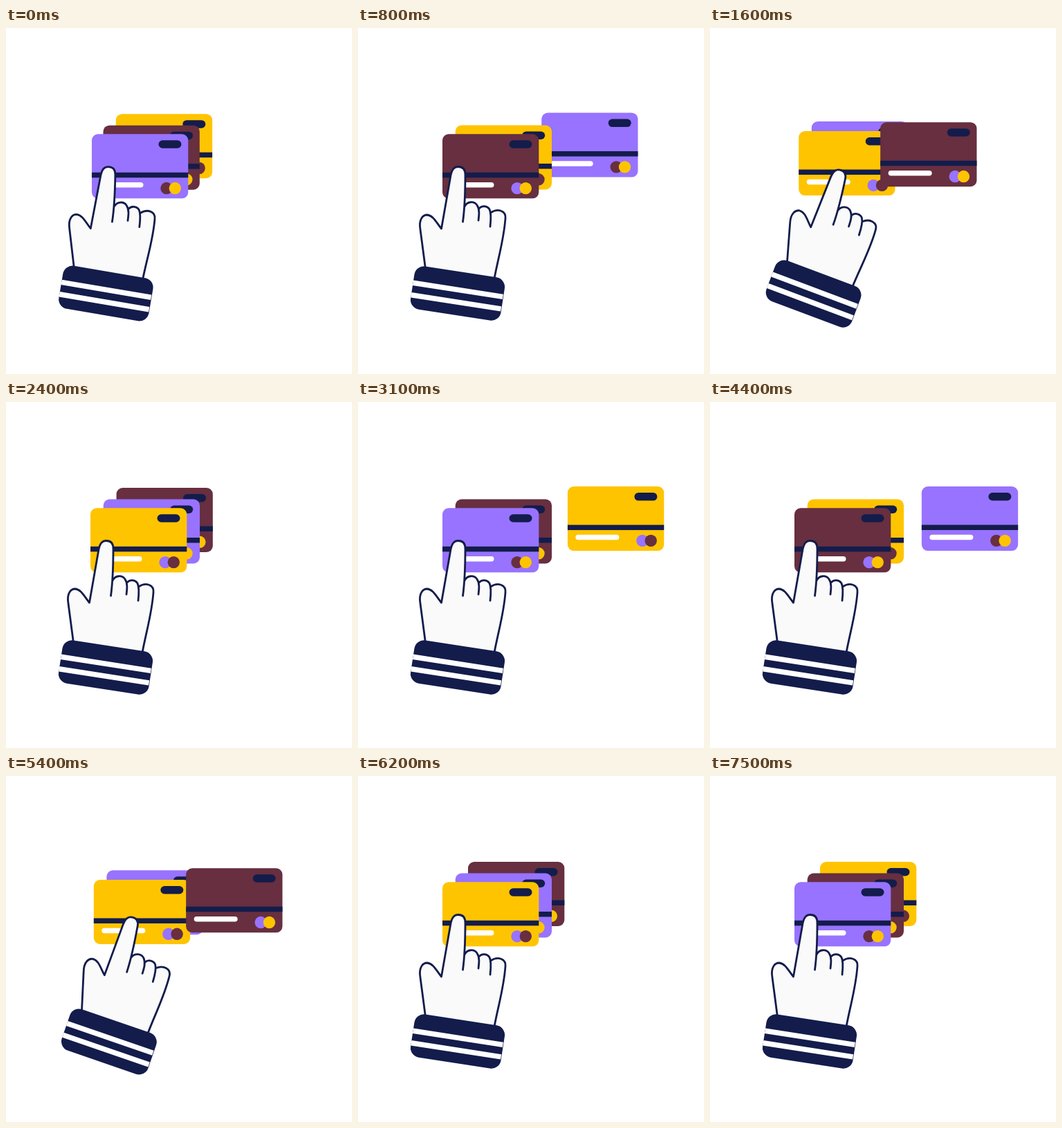
Write an HTML page that moves like this. It is 500 px wide and 500 px high and loops after 7600 ms.

```html
<!DOCTYPE html>
<html lang="en">
<head>
<meta charset="utf-8">
<title>Card stack</title>
<style>
  html, body { margin: 0; height: 100%; overflow: hidden; background: #fff; }
  svg { display: block; width: 100%; height: 100%; }
</style>
</head>
<body>
<svg viewBox="0 0 500 500">
  <g id="stack"></g>
  <g id="hand">
    <path d="M97.500 348 L90 291 C87.500 276 94 270 100 270 C109 271 113 281 120.500 290
             L134 213 C136 204 139 200.500 145 200.500 C151 200.500 155 204 155 212 L154 257
             C158 251 169 249 174 260 C179 255 189 258 191 266
             C202 260 214 264 213 275 C211 305 203 330 197 362 Z" fill="#fafafa"/>
    <path d="M97.500 348 L90 291 C87.500 276 94 270 100 270 C109 271 113 281 120.500 290
             L134 213 C136 204 139 200.500 145 200.500 C151 200.500 155 204 155 212
             C155 235 154 262 151.500 280
             M154 258 C158 250 168 250 172 256 C176 262 175 270 174 278
             M175 261 C179 256 187 257 190 262 C193 268 192 278 191 287
             M191.500 267 C202 260 214 264 213 275 C211 305 203 330 197 362"
          fill="none" stroke="#131c4b" stroke-width="2.800" stroke-linecap="round" stroke-linejoin="round"/>
    <g transform="translate(144 383.500) rotate(8.800)">
      <rect x="-66" y="-31.500" width="132" height="63" rx="14" fill="#131c4b"/>
      <path d="M-66 -5.200H65.300M-66 12.500H65.300" stroke="#fff" stroke-width="7.500"/>
    </g>
  </g>
</svg>
<script>
const LOOP = 7600, ROUND = 3770;
const PURPLE = '#9873ff', MAROON = '#672f40', YELLOW = '#ffc400', NAVY = '#131c4b';
const stack = document.getElementById('stack');
const hand = document.getElementById('hand');

const makeCard = (fill, left, right) => {
  const g = document.createElementNS('http://www.w3.org/2000/svg', 'g');
  g.innerHTML = `
    <rect width="139.300" height="93" rx="9" fill="${fill}"/>
    <rect y="55.500" width="139.300" height="7.500" fill="${NAVY}"/>
    <rect x="96.500" y="9" width="33" height="11.500" rx="5.750" fill="${NAVY}"/>
    <rect x="11.500" y="69.700" width="63" height="7.600" rx="3.800" fill="#fff"/>
    <circle cx="108" cy="78.300" r="8.700" fill="${left}"/>
    <circle cx="120.300" cy="78.300" r="8.700" fill="${right}"/>`;
  return g;
};
const cards = [
  makeCard(PURPLE, MAROON, YELLOW),
  makeCard(MAROON, PURPLE, YELLOW),
  makeCard(YELLOW, PURPLE, MAROON),
];

const FRONT = [122, 153.3], MID = [140.700, 140.500], BACK = [159, 124], OUT = [308, 122];
// start of each swipe and the moment its card is furthest out
const swipes = [[-40, 585], [1254, 1824], [2460, 3030]];

const ease = (t, from, to) => {
  const x = Math.min(1, Math.max(0, (t - from) / (to - from)));
  return (1 - Math.cos(Math.PI * x)) / 2;
};
const mix = (a, b, f) => a + (b - a) * f;
const place = (card, a, b, fx, fy = fx) =>
  card.setAttribute('transform', `translate(${mix(a[0], b[0], fx)} ${mix(a[1], b[1], fy)})`);

function draw(time) {
  const t = time % LOOP;
  const p = t < 3700 ? t : t < 7500 ? t - ROUND : t - LOOP;
  const k = p < swipes[1][0] ? 0 : p < swipes[2][0] ? 1 : 2;
  const [start, peak] = swipes[k];
  const [first, second, third] = [0, 1, 2].map(i => cards[(k + i) % 3]);

  const out = ease(p, start, peak);
  place(second, MID, FRONT, out);
  place(third, BACK, MID, out);
  if (p < peak) {
    place(first, FRONT, OUT, out, out ** 1.5);
    stack.replaceChildren(third, second, first);
  } else {
    place(first, OUT, BACK, ease(p, peak, peak + 600));
    stack.replaceChildren(first, third, second);
  }

  const turn = 13.9 * (ease(p, start, start + 260) - ease(p, start + 260, start + 600));
  hand.setAttribute('transform', `rotate(${turn} 144 411)`);
}

const begin = performance.now();
(function tick() {
  draw(performance.now() - begin);
  requestAnimationFrame(tick);
})();
</script>
</body>
</html>
```
